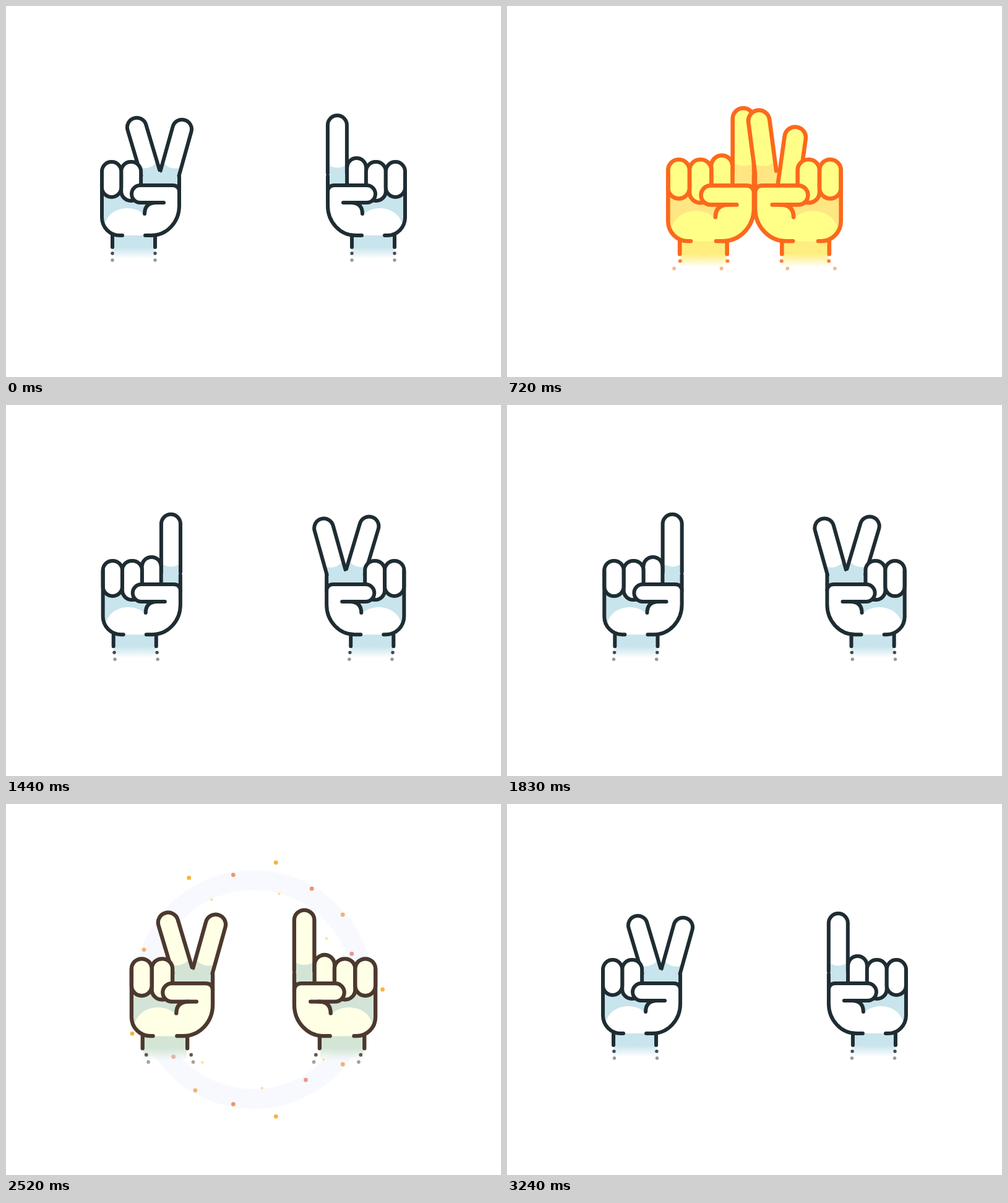
Write an HTML page that moves like this. It is 800 px wide and 600 px high and loops after 3.27 s.

```html
<!DOCTYPE html>
<html lang="en">
<head>
<meta charset="utf-8">
<title>Hands</title>
<style>
  html, body { margin: 0; width: 100%; height: 100%; overflow: hidden; background: #fff; }
  svg { display: block; width: 100vw; height: 100vh; }
  .line { fill: none; stroke: var(--line); stroke-width: 6; stroke-linecap: round; stroke-linejoin: round; }
  .skin { fill: var(--skin); }
  .shade { fill: var(--shade); }
  .outlined { stroke: var(--line); stroke-width: 6; }
  .dot { fill: var(--line); }
</style>
</head>
<body>
<svg id="stage" viewBox="0 0 800 600">
  <defs>
    <linearGradient id="fade" x1="0" y1="0" x2="0" y2="1">
      <stop offset="0.5" stop-color="var(--wrist)"/>
      <stop offset="1" stop-color="var(--wrist)" stop-opacity="0"/>
    </linearGradient>
  </defs>
  <circle id="ring" cx="400" cy="300" fill="none" stroke="#e4ecff"/>
  <g id="sparks"></g>
  <g id="hands"></g>
</svg>
<script>
const LOOP = 3270, SECOND = 1680, HIT = 705, RETURN = 885;
const stage = document.getElementById('stage');
const ring = document.getElementById('ring');

const clamp = (v, lo = 0, hi = 1) => Math.min(hi, Math.max(lo, v));
const mix = (a, b, k) => a + (b - a) * k;
const blend = (a, b, k) => `rgb(${a.map((v, i) => Math.round(mix(v, b[i], k)))})`;

function add(parent, name, attrs = {}) {
  const node = document.createElementNS('http://www.w3.org/2000/svg', name);
  set(node, attrs);
  return parent.appendChild(node);
}
function set(node, attrs) {
  for (const key in attrs) node.setAttribute(key, attrs[key]);
}

// Piecewise linear value from [time, value] pairs.
function track(keys, t) {
  const i = keys.findIndex(k => k[0] >= t);
  if (i < 0) return keys[keys.length - 1][1];
  if (i === 0) return keys[0][1];
  const [t0, a] = keys[i - 1], [t1, b] = keys[i];
  return mix(a, b, (t - t0) / (t1 - t0));
}

const colors = {
  line: [[31, 45, 51], [255, 106, 28]],
  skin: [[255, 255, 255], [255, 255, 133]],
  shade: [[200, 228, 236], [255, 230, 128]],
  wrist: [[200, 228, 236], [255, 238, 126]]
};

// Sideways swing of the dots under the wrist, by time from contact.
const swing = [
  [[-705, 0], [-555, -0.7], [-75, -3], [15, 0.5], [120, 6], [375, 2.4], [855, 0.9], [885, 0]],
  [[-705, 0], [-555, -1.8], [-75, -7.5], [15, -8.3], [130, 9], [375, 4.9], [855, 1.5], [885, 0]]
];

function makeFinger(parent) {
  const group = add(parent, 'g');
  return {
    group,
    base: add(group, 'path', { class: 'shade' }),
    top: add(group, 'path', { class: 'skin' }),
    line: add(group, 'path', { class: 'line' })
  };
}

function poseFinger(finger, x, y, angle, length, tail, shaded) {
  const cap = `V${-length}A15.5 15.5 0 0 1 15.5 ${-length}`;
  set(finger.group, { transform: `translate(${x} ${y}) rotate(${angle})` });
  set(finger.base, { d: `M-15.5 20${cap}V20Z` });
  set(finger.top, { d: shaded ? `M-15.5 -14${cap}V-14Q0 -4 -15.5 -14Z` : `M-15.5 20${cap}V20Z` });
  set(finger.line, { d: `M-15.5 ${tail}${cap}V${tail}` });
}

function makeHand(mirrored) {
  const root = add(document.getElementById('hands'), 'g',
    mirrored ? { transform: 'translate(800 0) scale(-1 1)' } : {});
  const body = add(root, 'g');
  const path = (cls, d) => add(body, 'path', { class: cls, d });
  const pill = (x, w, h) => add(body, 'rect',
    { class: 'skin outlined', x, y: 252, width: w, height: h, rx: 15.5 });

  add(body, 'rect', { x: 173, y: 371, width: 67, height: 38, fill: 'url(#fade)' });
  add(body, 'path', { class: 'line', 'stroke-linecap': 'butt', d: 'M172 371V390M241 371V390' });
  const dots = [[400, 0.85], [411, 0.48]].map(([cy, opacity]) => {
    const pair = add(body, 'g', { opacity });
    for (const cx of [172, 241]) add(pair, 'circle', { class: 'dot', cx, cy, r: 2.7 });
    return pair;
  });

  path('shade', 'M155 285H219V272H238V265H261V272H280V323A45 48 0 0 1 235 371H184A29 29 0 0 1 155 342Z');
  path('skin', 'M160 352C168 321 214 320 226 342V371H184Q165 370 160 352Z');
  path('skin', 'M224 371V336Q224 318 243 318H280V323A45 48 0 0 1 235 371Z');
  const index = makeFinger(body);
  path('line', 'M280 275V300');
  const middle = makeFinger(body);
  pill(186.2, 31.9, 63);
  pill(155, 31.2, 57);
  path('line', 'M155 268V342A29 29 0 0 0 184 371H188');
  path('skin', 'M217 290H269Q280 290 280 301V320H217A14 14 0 0 1 217 290Z');
  path('line', 'M255 318H217A14 14 0 0 1 217 290H269Q280 290 280 301V323A45 48 0 0 1 235 371H225');
  path('line', 'M243 318Q224 318 224 336');
  return { body, dots, index, middle };
}

function poseHand(hand, near, rise, since) {
  const scale = 1 + 0.11 * near;
  const spread = rise ** 1.5;
  set(hand.body, {
    transform: `translate(${280 + 120 * near} 286.5) scale(${scale}) translate(-280 -286.5)`
  });
  hand.dots.forEach((dot, i) => set(dot, { transform: `translate(${track(swing[i], since)} 0)` }));
  poseFinger(hand.index, 264.6, 270.5, 15.6 * spread, mix(78, 74, rise), 0, true);
  poseFinger(hand.middle, 233.4 - 5 * Math.sin(Math.PI * rise), 270, -16.6 * spread,
    mix(8.5, 77, rise), rise < 1 ? 20 : -0.5, rise > 0.95);
}

// Two rings of confetti: large outer pieces and pale inner ones.
const sparkGroup = document.getElementById('sparks');
const sparks = [];
const kinds = [[1, '#f5b53d'], [0.903, '#f0956a'], [0.903, '#f3b36b'], [0.81, '#e79a8c']];
for (let i = 0; i < 18; i++) {
  const [reach, fill] = kinds[(i % 14) % 4];
  sparks.push({ angle: i * 20, reach, size: 1, node: add(sparkGroup, 'circle', { fill }) });
}
for (let i = 0; i < 9; i++) {
  sparks.push({ angle: 85 + i * 40, reach: i % 5 === 1 ? 0.69 : 0.768, size: 0.6,
    node: add(sparkGroup, 'circle', { fill: '#ffdf7a' }) });
}

function drawBurst(since) {
  const radius = since > 15 ? 291 * (1 - Math.exp(-since / 125)) : 0;
  const width = Math.min(32, radius);
  const glow = (0.15 + 0.3 * clamp(1 - since / 300)) * clamp((600 - since) / 150);
  set(ring, { r: Math.max(0, radius - width / 2), 'stroke-width': width, opacity: radius ? glow : 0 });

  const spread = 274 * (1 - Math.exp(-Math.max(0, since) / 95));
  const size = since > 15 ? 5 * clamp(1 - since / 430) : 0;
  for (const s of sparks) {
    const a = s.angle * Math.PI / 180;
    set(s.node, {
      cx: 400 + Math.cos(a) * spread * s.reach,
      cy: 300 + Math.sin(a) * spread * s.reach,
      r: size * s.size
    });
  }
}

function closeness(since) {
  if (since < 0) {
    const x = clamp(1 + since / HIT);
    return 0.47 * x ** 2 + 0.53 * x ** 14;
  }
  const y = clamp(1 - Math.max(0, since - 15) / (RETURN - 15));
  return 0.53 * y ** 2 + 0.47 * y ** 14;
}

const hands = [makeHand(false), makeHand(true)];

function draw(time) {
  const t = time % LOOP;
  const half = t < SECOND ? 0 : 1;
  const since = t - half * SECOND - HIT;
  const near = closeness(since);

  for (const name in colors) {
    stage.style.setProperty('--' + name, blend(...colors[name], near ** 2));
  }
  hands.forEach((hand, i) => {
    const rise = i === half ? clamp(-since / 45) : clamp((since + 30) / 75);
    poseHand(hand, near, rise, since);
  });
  drawBurst(since);
}

const start = performance.now();
function tick() {
  draw(performance.now() - start);
  requestAnimationFrame(tick);
}
tick();
</script>
</body>
</html>
```
